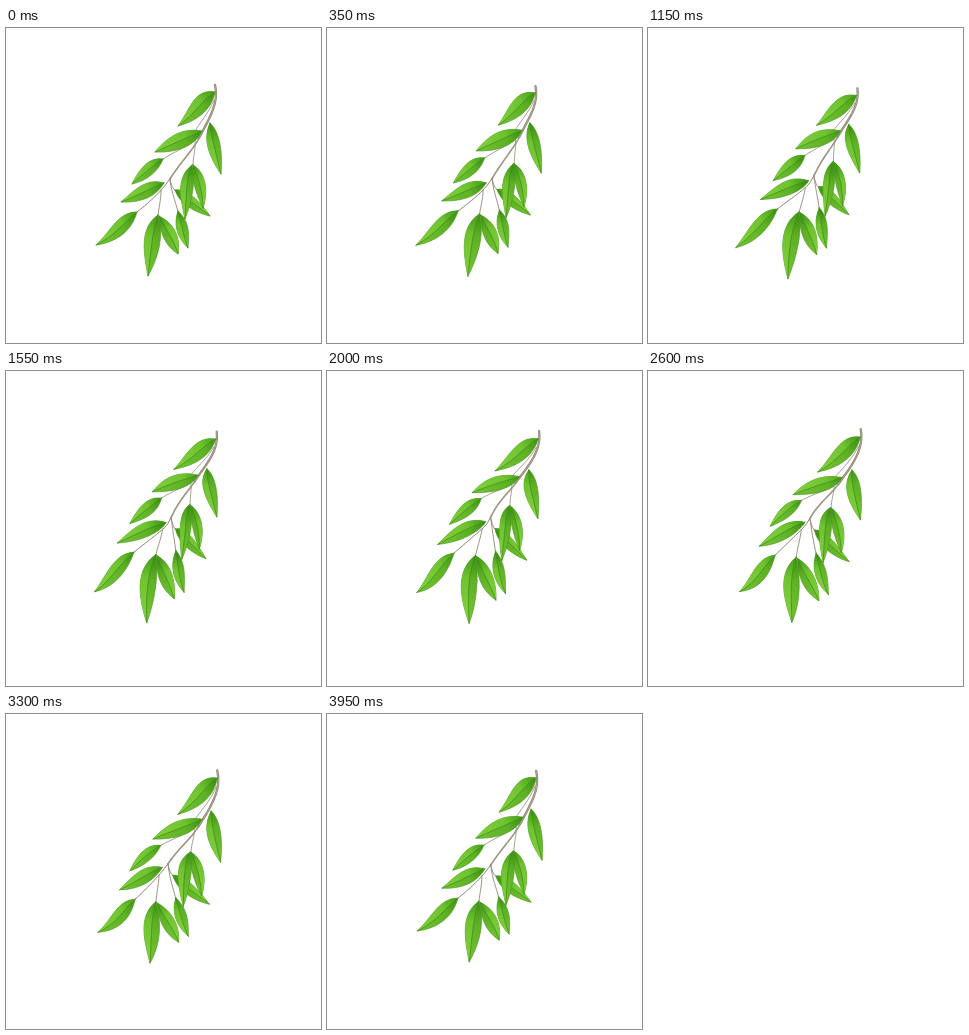
Animation of 315 by 315 pixels, one loop 4000 ms. Source, as an HTML page:

```html
<!DOCTYPE html>
<html lang="en">
<head>
<meta charset="utf-8">
<title>Swaying branch</title>
<style>
  html, body { margin: 0; width: 100%; height: 100%; overflow: hidden; background: #fff; }
  svg { display: block; width: 100vw; height: 100vh; }
</style>
</head>
<body>
<svg id="stage" viewBox="0 0 315 315"></svg>
<script>
const LOOP = 4000, STEP = 50, CENTER = 157, AMPLITUDE = 2.2;
const stage = document.getElementById('stage');

// base, tip, two controls of one edge, two controls of the other edge
const leaves = [
  [169,162, 204,188, 180,160, 193,172, 174,178, 194,186],
  [187,137, 197,180, 199,144, 203,162, 185,152, 191,168],
  [186,137, 179,191, 170,150, 174,168, 190,146, 187,172],
  [209,64, 172,98, 188,60, 184,82, 206,80, 194,92],
  [196,103, 149,124, 178,100, 164,106, 190,117, 172,125],
  [157,131, 126,156, 143,129, 134,140, 152,144, 140,153],
  [158,155, 115,174, 140,150, 130,161, 150,169, 134,175],
  [131,184, 90,217, 112,184, 106,202, 126,202, 112,214],
  [153,188, 172,226, 167,195, 175,208, 154,210, 163,220],
  [152,187, 142,248, 134,200, 137,222, 158,208, 153,228],
  [172,183, 182,220, 167,198, 172,210, 184,194, 183,206],
  [204,95, 215,146, 196,112, 204,130, 213,103, 217,122]
];

// width, then the four points of a cubic
const stems = [
  [0.8, 208,72, 203,84, 196,92, 189,103],
  [0.8, 188,113, 178,120, 170,123, 157,131],
  [0.8, 189,112, 190,120, 187,128, 187,138],
  [0.9, 164,151, 165,163, 169,172, 172,184],
  [1.0, 164,151, 165,156, 166,160, 170,163],
  [0.9, 155,162, 155,172, 153,178, 152,188],
  [1.0, 165,149, 157,162, 145,173, 131,184],
  [1.5, 193,110, 187,122, 174,135, 164,151],
  [2.3, 209,57, 213,75, 204,89, 193,110]
];

function add(name, attributes, parent = stage) {
  const node = document.createElementNS('http://www.w3.org/2000/svg', name);
  for (const key in attributes) node.setAttribute(key, attributes[key]);
  return parent.appendChild(node);
}

// Points circle in place; the phase spreads outwards from the centre.
function sway([x, y], time) {
  const delay = 3150 - 23.5 * Math.hypot(x - CENTER, y - CENTER);
  const angle = 2 * Math.PI * (time - delay) / LOOP;
  return [-AMPLITUDE * Math.cos(angle), AMPLITUDE * Math.sin(angle)];
}

function cubic(a, b, c, d, count = 16) {
  return Array.from({ length: count + 1 }, (_, i) => {
    const u = i / count, v = 1 - u;
    return [0, 1].map(k =>
      v * v * v * a[k] + 3 * v * v * u * b[k] + 3 * v * u * u * c[k] + u * u * u * d[k]);
  });
}

const pairs = list => list.reduce((out, n, i) => (i % 2 ? out[out.length - 1].push(n) : out.push([n]), out), []);
const middle = (a, b) => [(a[0] + b[0]) / 2, (a[1] + b[1]) / 2];
const shapes = [];

function addShape(points, attributes) {
  const start = points.map(p => {
    const [dx, dy] = sway(p, 0);
    return { p, x: p[0] - dx, y: p[1] - dy };
  });
  shapes.push({ start, node: add('path', { 'stroke-linecap': 'round', 'stroke-linejoin': 'round', ...attributes }) });
}

const defs = add('defs', {});
function gradient(id, from, to, colors) {
  const node = add('linearGradient', {
    id, gradientUnits: 'userSpaceOnUse', x1: from[0], y1: from[1], x2: to[0], y2: to[1]
  }, defs);
  colors.forEach((color, i) => add('stop', { offset: [0, 0.35, 1][i], 'stop-color': color }, node));
  return `url(#${id})`;
}

function addStem([width, ...numbers]) {
  const points = cubic(...pairs(numbers));
  addShape(points, { fill: 'none', stroke: '#8f8473', 'stroke-width': width });
  if (width > 1.4) addShape(points, { fill: 'none', stroke: '#b9ae9c', 'stroke-width': width * 0.35 });
}

function addLeaf(numbers, index) {
  const [base, tip, a1, a2, b1, b2] = pairs(numbers);
  const edgeA = cubic(base, a1, a2, tip);
  const edgeB = cubic(base, b1, b2, tip);
  const rib = cubic(base, middle(a1, b1), middle(a2, b2), tip);
  const back = [...rib].reverse();
  const light = gradient(`light${index}`, base, tip, ['#439b18', '#6fc32f', '#82d03f']);
  const dark = gradient(`dark${index}`, base, tip, ['#3a8d13', '#5db024', '#73c433']);
  addShape([...edgeA, ...[...edgeB].reverse()], { fill: dark, stroke: '#4f9c23', 'stroke-width': 0.7 });
  addShape([...edgeA, ...back], { fill: light });
  addShape(rib, { fill: 'none', stroke: '#3f8e18', 'stroke-width': 0.8 });
}

stems.forEach(addStem);
leaves.forEach(addLeaf);

function render(time) {
  for (const { start, node } of shapes) {
    const path = start.map(({ p, x, y }) => {
      const [dx, dy] = sway(p, time);
      return `${(x + dx).toFixed(2)} ${(y + dy).toFixed(2)}`;
    });
    node.setAttribute('d', 'M' + path.join('L'));
  }
}

const begin = performance.now();
function tick() {
  const elapsed = (performance.now() - begin) % LOOP;
  render(Math.floor(elapsed / STEP) * STEP);
  requestAnimationFrame(tick);
}
tick();
</script>
</body>
</html>
```
